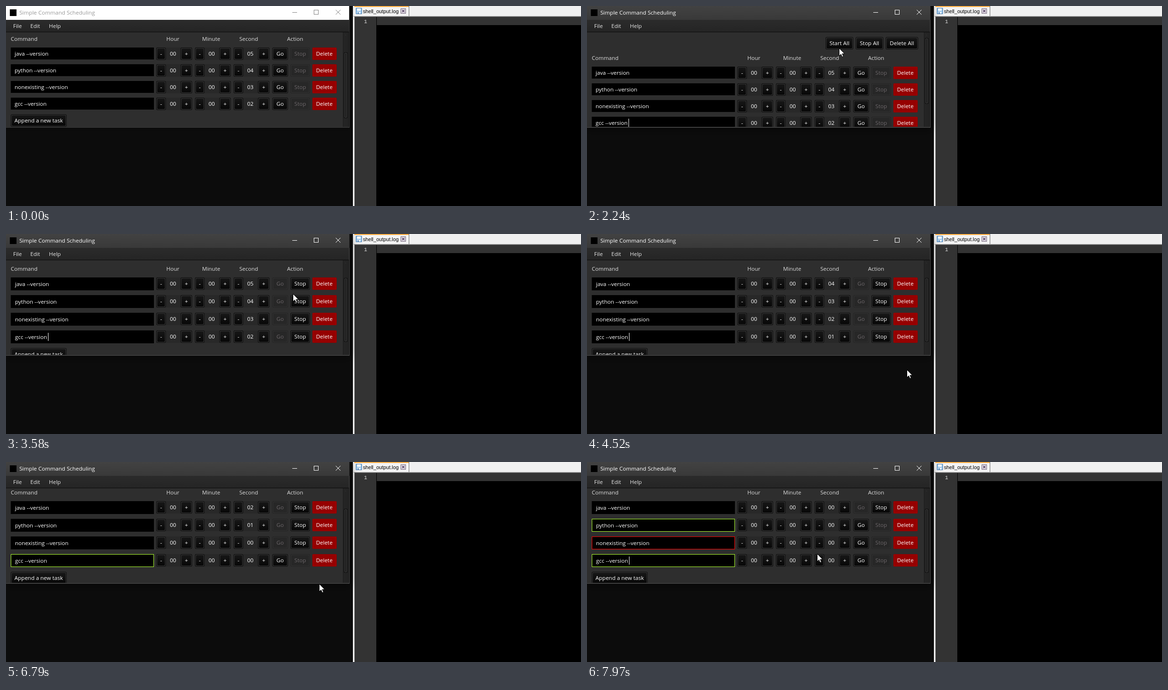
These frames come from a looping animation (1205 px wide and 419 px high, 8000 ms). An HTML page with a canvas:

```html
<!DOCTYPE html>
<html lang="en">
<head>
<meta charset="utf-8">
<title>Simple Command Scheduling</title>
<style>
html, body { margin: 0; width: 100%; height: 100%; overflow: hidden; background: #0c0c0c; }
canvas { display: block; }
</style>
</head>
<body>
<canvas id="stage" width="1205" height="419"></canvas>
<script>
const ctx = document.getElementById('stage').getContext('2d');
const LOOP = 8000;
const SANS = '"Open Sans", "Noto Sans", sans-serif';

const TASKS = [
  { cmd: 'java --version', secs: 5 },
  { cmd: 'python --version', secs: 4 },
  { cmd: 'nonexisting --version', secs: 3, fails: true },
  { cmd: 'gcc --version', secs: 2 }
];

// Times in ms
const FOCUS = 2240, START = 2410, ERROR = 6940, CLOSE = 7970;
const TICKS = [3810, 4860, 5920, 6940, 7890];
const BLINKS = [2240, 2770, 3270, 3740, 4240, 4730, 5230, 5770, 6230, 6720, 7970];
const SCROLL = [[0, 69], [990, 77], [1230, 93], [1300, 109], [3270, 91], [3580, 73], [5140, 64]];

// Pointer moves: first step, last step, number of steps, from, to
const MOVES = [
  [200, 760, 8, [1086, 387], [654, 119]],
  [1760, 2240, 7, [654, 119], [528, 88]],
  [2410, 2800, 6, [528, 88], [601, 125]],
  [4120, 4520, 6, [601, 125], [670, 284]],
  [4600, 4910, 5, [670, 284], [648, 242]],
  [6620, 7180, 8, [648, 242], [673, 283]],
  [7410, 7890, 7, [673, 283], [482, 192]]
];

const passed = (list, t) => list.filter(v => v <= t).length;

function pointerAt(t) {
  const move = MOVES.filter(m => m[0] <= t).pop();
  if (!move) return null;
  const [t0, t1, n, a, b] = move;
  const i = Math.min(n - 1, Math.floor((t - t0) / (t1 - t0) * (n - 1) + 1e-6));
  const p = t0 === 200 ? i / (n - 1) : (i + 1) / n;
  const e = p * p * (3 - 2 * p);
  return [a[0] + (b[0] - a[0]) * e, a[1] + (b[1] - a[1]) * e].map(Math.round);
}

function box(x, y, w, h, fill) {
  ctx.fillStyle = fill;
  ctx.fillRect(x, y, w, h);
}

function outline(x, y, w, h, color) {
  ctx.strokeStyle = color;
  ctx.lineWidth = 1;
  ctx.strokeRect(x + .5, y + .5, w - 1, h - 1);
}

function round(x, y, w, h, r, fill) {
  ctx.fillStyle = fill;
  ctx.beginPath();
  ctx.roundRect(x, y, w, h, r);
  ctx.fill();
}

function fade(y0, y1, c0, c1) {
  const g = ctx.createLinearGradient(0, y0, 0, y1);
  g.addColorStop(0, c0);
  g.addColorStop(1, c1);
  return g;
}

// y is the middle of the capitals
function text(s, x, y, color = '#fff', size = 11.5, align = 'left', family = SANS) {
  ctx.font = size + 'px ' + family;
  ctx.textAlign = align;
  ctx.fillStyle = color;
  ctx.fillText(s, x, y + 4);
}

function cross(cx, cy, r, color, width) {
  ctx.strokeStyle = color;
  ctx.lineWidth = width;
  ctx.beginPath();
  ctx.moveTo(cx - r, cy - r);
  ctx.lineTo(cx + r, cy + r);
  ctx.moveTo(cx + r, cy - r);
  ctx.lineTo(cx - r, cy + r);
  ctx.stroke();
}

function button(label, x, y, w, off) {
  const top = y - 13;
  round(x, top, w, 26, 3, off ? '#232323' : '#0a0a0a');
  round(x + 1, top + 1, w - 2, 24, 2, off ? '#323232' : '#383838');
  round(x + 2, top + 2, w - 4, 22, 2,
    off ? '#272727' : fade(top, top + 26, '#181818', '#060606'));
  text(label, x + w / 2, y, off ? '#6c676a' : '#fff', 11.5, 'center');
}

function editor() {
  box(727, 0, 478, 23, '#f0f0f0');
  box(727, 0, 4, 419, '#f0f0f0');
  box(728, 21, 477, 1, '#a0a0a0');
  box(730, 22, 475, 1, '#696969');
  box(730, 22, 1, 397, '#696969');
  box(731, 23, 45, 396, '#333');
  box(776, 23, 429, 396, '#000');
  box(777, 23, 428, 17, '#333');
  box(730, 0, 114, 21, '#f4f4f4');
  box(730, 0, 114, 2, '#faaa3c');
  box(844, 0, 1, 21, '#696969');

  round(733, 4, 13, 13, 1, '#4c7fb0');
  box(734, 5, 11, 11, '#9cc8ee');
  box(736, 5, 7, 5, '#fff');
  box(736, 12, 7, 4, '#e4eef6');
  box(737, 13, 2, 3, '#4c7fb0');
  text('shell_output.log', 748, 11, '#000', 10.7, 'left', '"Liberation Sans", Arial, sans-serif');
  round(827, 5, 11, 11, 1, '#685a70');
  box(828, 6, 9, 9, '#f2edf4');
  cross(832.5, 10.5, 2.7, '#62506e', 1.8);
  text('1', 753.5, 32, '#e2e2e2', 11, 'center', '"Liberation Mono", monospace');
}

function frame(active) {
  ctx.save();
  ctx.shadowColor = active ? 'rgba(0,0,0,.55)' : 'rgba(0,0,0,.25)';
  ctx.shadowBlur = active ? 18 : 8;
  ctx.shadowOffsetY = 2;
  box(0, 0, 720, 255, '#2e2e2e');
  ctx.restore();
  box(0, 0, 719, 29, active ? fade(0, 29, '#424242', '#393939') : '#fff');
  box(8, 7, 14, 14, '#000');
  const ink = active ? '#fff' : '#858585';
  text('Simple Command Scheduling', 28, 14, active ? '#fff' : '#999', 11.6);
  box(600, 13, 10, 1, ink);
  outline(645, 8, 10, 10, ink);
  cross(696, 13, 5, ink, 1);

  box(0, 29, 719, 25, fade(29, 54, '#2b2b2b', '#252525'));
  text('File', 15, 42, '#e6e6e6');
  text('Edit', 51, 42, '#e6e6e6');
  text('Help', 90, 42, '#e6e6e6');
  box(0, 54, 719, 1, '#0a0a0a');
  box(0, 254, 720, 1, active ? '#4e4e4e' : '#3a3a3a');
  box(719, 29, 1, 226, active ? '#4e4e4e' : '#3a3a3a');
}

function scrollbar(head, running) {
  box(706, 55, 13, 199, '#1c1c1c');
  box(707, 55, 10, 199, '#242424');
  const y = Math.round(67 + (109 - head) * (running ? .69 : .75));
  const h = running ? 134 : 138;
  round(708, y, 8, h, 2, '#0c0c0c');
  round(709, y + 1, 6, h - 2, 2, '#3b3b3b');
  round(710, y + 2, 4, h - 4, 1, '#222');
  text('ˆ', 711.5, 65, '#333', 10, 'center');
}

function spinner(x, y, value) {
  box(x, y - 13, 75, 26, '#282828');
  button('-', x, y, 20);
  text(String(value).padStart(2, '0'), x + 35, y, '#fff', 11.5, 'center');
  button('+', x + 51, y, 24);
}

function row(task, i, y, t, pointer) {
  const running = t >= START;
  const ticks = running ? passed(TICKS, t) : 0;
  const done = ticks > task.secs;
  const busy = running && !done;
  const ty = running ? y + 1 : y;
  const h = running ? 27 : 25;
  box(10, y - 13, 300, h, '#000');
  if (done) outline(10, y - 13, 300, h, task.fails ? '#f00' : '#adff2f');
  text(task.cmd, running ? 19 : 18, ty);
  if (i === 3 && passed(BLINKS, t) % 2) box(running ? 88 : 87, ty - 9, 1, 17, '#fff');
  spinner(315, y, 0);
  spinner(396, y, 0);
  spinner(477, y, Math.max(0, task.secs - ticks));
  button('Go', 558, y, 33, busy);
  button('Stop', 596, y, 41, !busy);
  const hover = pointer && pointer[0] > 641 && pointer[0] < 693 && Math.abs(pointer[1] - y) < 13;
  round(642, y - 13, 51, 26, 2, hover ? '#b91e1e' : '#960000');
  text('Delete', 667, y, '#fff', 11.5, 'center');
}

function content(t, pointer) {
  const running = t >= START;
  const head = SCROLL.filter(s => s[0] <= t).pop()[1];
  const pitch = running ? 37 : 35;
  ctx.save();
  ctx.beginPath();
  ctx.rect(0, 55, 719, 198);
  ctx.clip();
  button('Start All', 500, head - 31, 58);
  button('Stop All', 563, head - 31, 58);
  button('Delete All', 626, head - 31, 68);
  [['Command', 10], ['Hour', 336], ['Minute', 411], ['Second', 489], ['Action', 589]]
    .forEach(([s, x]) => text(s, x, head, '#dcdcdc'));
  TASKS.forEach((task, i) => row(task, i, head + 31 + i * pitch, t, pointer));
  button('Append a new task', 10, head + 31 + 4 * pitch, 117);
  scrollbar(head, running);
  ctx.restore();
}

function dialog() {
  ctx.save();
  ctx.shadowColor = 'rgba(0,0,0,.5)';
  ctx.shadowBlur = 16;
  ctx.shadowOffsetY = 2;
  box(178, 18, 362, 195, '#2e2e2e');
  ctx.restore();
  box(179, 19, 360, 30, '#3a3a3a');
  box(188, 27, 14, 14, '#000');
  text('Error - Cannot run program "nonexisting": CreateProc...', 208, 34);
  cross(524, 33, 5, '#fff', 1.1);
  box(179, 49, 360, 67, fade(49, 116, '#2c2c2c', '#4b4b4b'));
  box(179, 116, 360, 1, '#161616');
  text('Failed to execute given command.', 189, 84, '#dcdcdc', 13.25);
  round(484, 62, 42, 42, 5, '#f4f4f4');
  round(487, 65, 36, 36, 3, fade(65, 101, '#d25a56', '#c04844'));
  cross(505, 83, 7.5, '#fff', 3);
  text('Cannot run program "nonexisting": CreateProcess error=2, The', 189, 142, '#dcdcdc');
  text('system cannot find the file specified', 189, 159, '#dcdcdc');
  round(454, 177, 75, 26, 3, '#12384a');
  round(455, 178, 73, 24, 3, '#234f63');
  round(457, 180, 69, 20, 2, fade(180, 200, '#181818', '#080808'));
  text('OK', 491, 190, '#fff', 11.5, 'center');
  outline(178, 18, 362, 195, '#555');
}

function arrow([x, y]) {
  const pts = [[0, 0], [0, 16], [3.7, 12.5], [6.3, 18.2], [8.8, 17.1], [6.3, 11.5], [11.3, 11.5]];
  ctx.beginPath();
  pts.forEach(([dx, dy]) => ctx.lineTo(x + .5 + dx, y + .5 + dy));
  ctx.closePath();
  ctx.fillStyle = '#fff';
  ctx.fill();
  ctx.strokeStyle = '#000';
  ctx.lineWidth = 1;
  ctx.stroke();
}

function draw(t) {
  const pointer = pointerAt(t);
  const failed = t >= ERROR && t < CLOSE;
  box(0, 0, 1205, 419, '#0c0c0c');
  editor();
  frame(t >= FOCUS && !failed);
  content(t, pointer);
  if (failed) dialog();
  if (pointer) arrow(pointer);
}

const began = performance.now();
function loop() {
  draw((performance.now() - began) % LOOP);
  requestAnimationFrame(loop);
}
loop();
</script>
</body>
</html>
```
